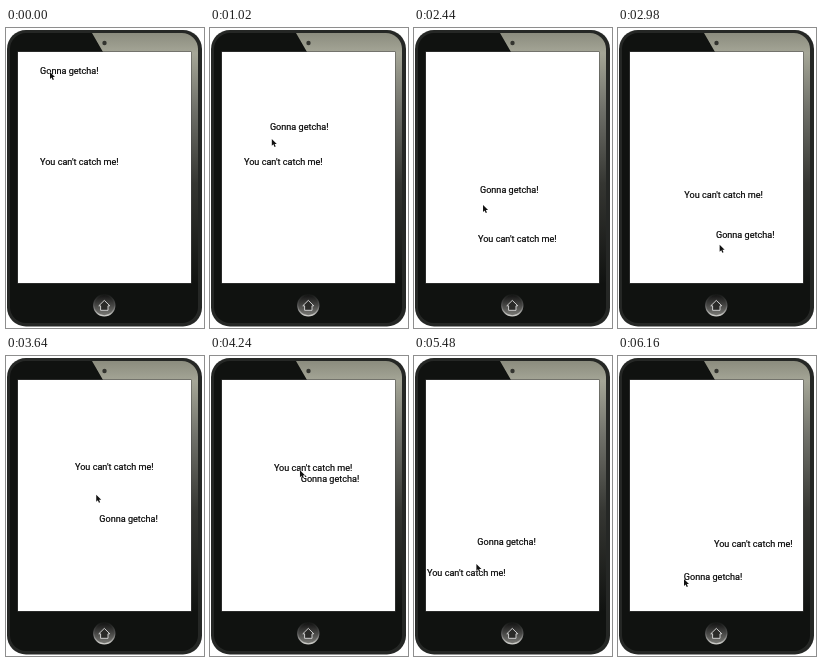
Write an HTML page that moves like this. It is 198 px wide and 300 px high and loops after 6440 ms.

```html
<!DOCTYPE html>
<html lang="en">
<head>
<meta charset="utf-8">
<title>Chase</title>
<style>
  html, body { margin: 0; width: 100%; height: 100%; overflow: hidden; background: #fff; }
  svg { display: block; width: 198px; height: 300px; }
  text { font: 9.1px Roboto, Arial, sans-serif; fill: #000; stroke: #000; stroke-width: .18px; }
</style>
</head>
<body>
<svg viewBox="0 0 198 300">
  <defs>
    <linearGradient id="gloss" x1="0" y1="0" x2="0" y2="1">
      <stop offset="0" stop-color="#8b8c7e"/>
      <stop offset=".08" stop-color="#a5a697"/>
      <stop offset=".3" stop-color="#70716a"/>
      <stop offset=".6" stop-color="#353632"/>
      <stop offset="1" stop-color="#101210"/>
    </linearGradient>
    <linearGradient id="ring" x1="0" y1="0" x2="0" y2="1">
      <stop offset="0" stop-color="#161816"/>
      <stop offset=".5" stop-color="#555"/>
      <stop offset="1" stop-color="#d0d0cc"/>
    </linearGradient>
    <linearGradient id="button" x1="0" y1="0" x2="0" y2="1">
      <stop offset="0" stop-color="#111"/>
      <stop offset="1" stop-color="#7c7c78"/>
    </linearGradient>
    <clipPath id="face"><rect x="4" y="5" width="188" height="290" rx="16"/></clipPath>
  </defs>

  <rect x="1" y="2" width="195" height="296.5" rx="19" fill="#252725"/>
  <rect x="4" y="5" width="188" height="290" rx="16" fill="#101210"/>
  <path d="M86 5H198V256H185V24H97Z" fill="url(#gloss)" clip-path="url(#face)"/>
  <circle cx="98.5" cy="15" r="2.2" fill="#33342f"/>
  <rect x="11.5" y="23.5" width="174" height="232" fill="#444"/>
  <rect x="12" y="24" width="173" height="231" fill="#fff"/>
  <circle cx="98.3" cy="277.3" r="10.6" fill="url(#button)" stroke="url(#ring)" stroke-width="1.2"/>
  <path d="M92.8 277.8 98.3 272.4 103.8 277.8H102V282.3H94.6V277.8Z" fill="#2a2a28" stroke="#ddd" stroke-width=".9" stroke-linejoin="round"/>

  <g id="runner"><text y="3.2">You can't catch me!</text></g>
  <g id="chaser"><text y="3.2">Gonna getcha!</text></g>
  <g id="pointer">
    <path d="M0 0V6.9L1.6 5.4 2.7 8 3.9 7.5 2.8 5H5Z" fill="#111" stroke="#fff" stroke-width=".8" paint-order="stroke" stroke-linejoin="round"/>
  </g>
</svg>
<script>
const LOOP = 6440, LAG = 130, HOP = 450;
const HOME = [34, 45];

// Mouse path: time in ms, x, y. Equal neighbours are rests.
const path = [
  [0, 44, 44], [680, 57, 86], [1220, 63, 118], [1400, 63, 118],
  [1660, 63, 138], [2200, 64, 153], [2440, 69, 177], [2600, 90, 190],
  [3050, 102, 218], [3400, 102, 218], [3520, 90, 150], [3900, 91, 128],
  [4080, 91, 128], [4400, 88, 101], [4740, 82, 115], [4900, 77, 121],
  [5360, 62, 192], [5700, 64, 226], [5950, 66, 223], [LOOP, 66, 223]
];

// Escapes: start time, then where the runner lands.
const hops = [[1590, 64, 210.5], [2770, 69, 111], [4200, 13, 216.5], [5530, 96, 187.5]];

// Slope at point i, flat at turns and rests so the curve never overshoots.
function slope(i, axis) {
  if (i === 0 || i === path.length - 1) return 0;
  const [a, b, c] = path.slice(i - 1, i + 2);
  const before = (b[axis] - a[axis]) / (b[0] - a[0]);
  const after = (c[axis] - b[axis]) / (c[0] - b[0]);
  return before * after > 0 ? 2 * before * after / (before + after) : 0;
}

function pointerAt(time) {
  if (time < 0) return HOME;
  const i = path.findIndex(p => p[0] > time) - 1;
  const a = path[i], b = path[i + 1];
  const span = b[0] - a[0], u = (time - a[0]) / span, v = 1 - u;
  return [1, 2].map(k => v * v * (1 + 2 * u) * a[k] + u * u * (3 - 2 * u) * b[k]
    + span * u * v * (v * slope(i, k) - u * slope(i + 1, k)));
}

// The chaser trails the mouse: a fading average of where it has been.
function chaserAt(time) {
  let x = 0, y = 0, total = 0;
  for (let age = 20; age <= 6 * LAG; age += 20) {
    const weight = Math.exp(-age / LAG), [px, py] = pointerAt(time - age);
    x += weight * px;
    y += weight * py;
    total += weight;
  }
  return [x / total, y / total - 2];
}

// Hops run steadily sideways and ease in and out vertically.
function runnerAt(time) {
  let x = 34, y = 133.3;
  for (const [begin, toX, toY] of hops) {
    const u = Math.min(1, Math.max(0, (time - begin) / HOP));
    x += (toX - x) * u;
    y += (toY - y) * u ** 3 * (10 - 15 * u + 6 * u * u);
  }
  return [x, y];
}

const movers = { pointer: pointerAt, chaser: chaserAt, runner: runnerAt };
const start = performance.now();
function draw() {
  const time = Math.max(0, performance.now() - start) % LOOP;
  for (const [id, place] of Object.entries(movers)) {
    document.getElementById(id).setAttribute('transform', `translate(${place(time)})`);
  }
  requestAnimationFrame(draw);
}
draw();
</script>
</body>
</html>
```
